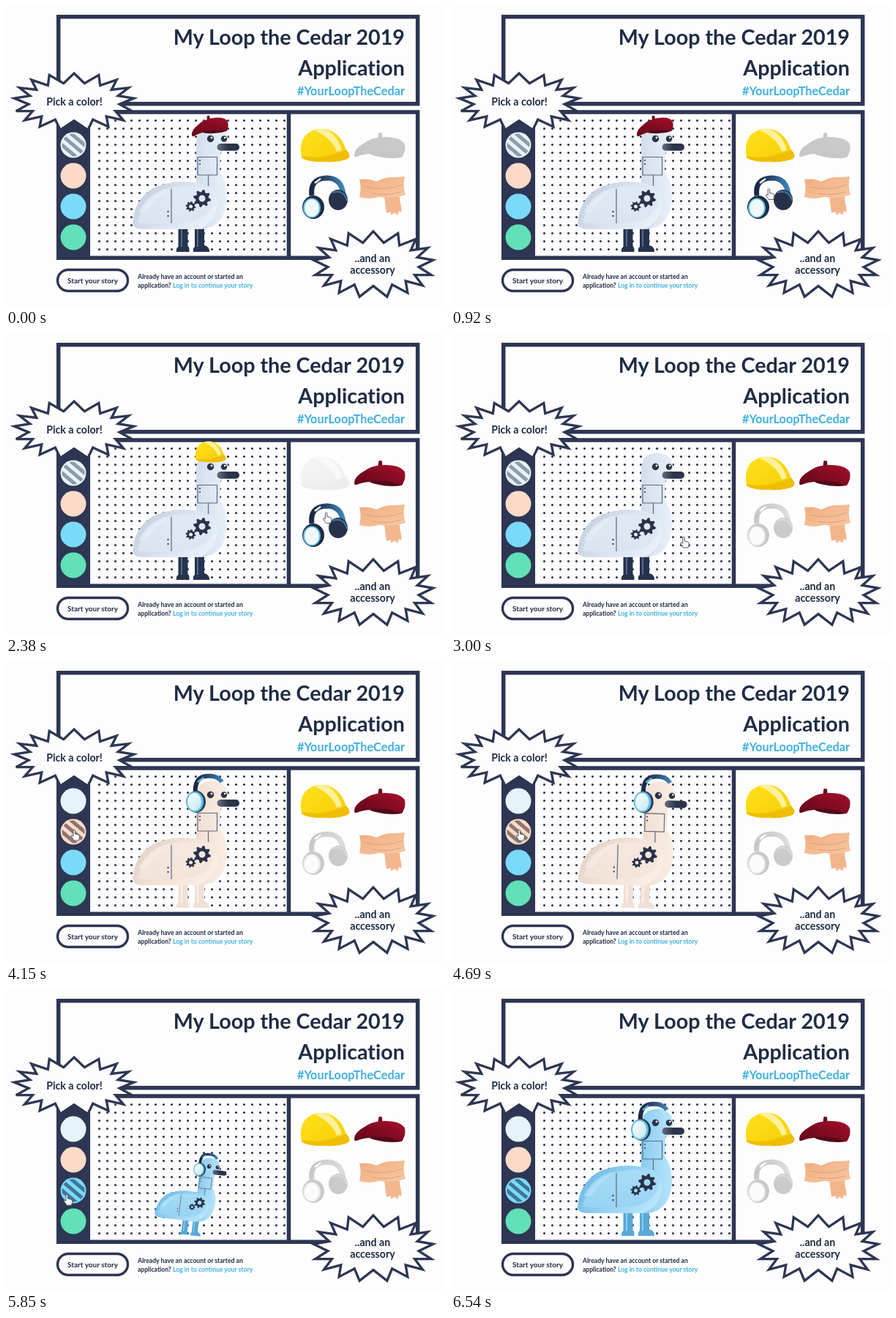
Write an HTML page that moves like this. It is 600x410 px and loops after 6620 ms.

```html
<!DOCTYPE html>
<html lang="en">
<head>
<meta charset="utf-8">
<title>Application</title>
<style>
html, body { margin: 0; width: 100%; height: 100%; overflow: hidden; background: #fdfdfe; }
svg { display: block; width: 600px; height: 410px; font-family: Lato, sans-serif; font-weight: 700; font-variant-ligatures: none; }
.ink { fill: #1f2c44; }
.teal { fill: #41b0e0; }
.line { fill: none; stroke: #2d3652; }
.thin { fill: none; stroke: #5c6a80; stroke-width: 1.2; }
.off { opacity: .24; filter: grayscale(1); }
</style>
</head>
<body>
<svg id="stage" viewBox="0 0 600 410">
<defs>
  <pattern id="dots" x="243" y="250.1" width="11" height="11" patternUnits="userSpaceOnUse">
    <circle cx="5.500" cy="5.500" r="1.550" fill="#26304a"/>
  </pattern>
  <linearGradient id="neck" x1="0" x2="1">
    <stop offset="0" style="stop-color:var(--shade)"/>
    <stop offset=".45" style="stop-color:var(--mid)"/>
    <stop offset="1" style="stop-color:var(--light)"/>
  </linearGradient>
  <linearGradient id="body" x1="0" y1=".2" x2="1" y2=".6">
    <stop offset="0" style="stop-color:var(--shade)"/>
    <stop offset=".5" style="stop-color:var(--mid)"/>
    <stop offset="1" style="stop-color:var(--light)"/>
  </linearGradient>
  <linearGradient id="wing" x1="0" y1="0" x2=".7" y2="1">
    <stop offset="0" style="stop-color:var(--light)"/>
    <stop offset="1" style="stop-color:var(--mid)"/>
  </linearGradient>
  <linearGradient id="beak"><stop stop-color="#666d80"/><stop offset=".5" stop-color="#2c344a"/></linearGradient>
  <linearGradient id="red" x1="0" y1="1" x2="1" y2="0"><stop stop-color="#5e0618"/><stop offset="1" stop-color="#a5102a"/></linearGradient>
  <linearGradient id="gold" x2="1" y2="1"><stop stop-color="#fee21c"/><stop offset="1" stop-color="#f6cb06"/></linearGradient>
  <linearGradient id="band"><stop stop-color="#1b2742"/><stop offset=".5" stop-color="#2b4a72"/><stop offset="1" stop-color="#3f86b5"/></linearGradient>
  <linearGradient id="pad" x2="1" y2="1"><stop stop-color="#fbfeff"/><stop offset="1" stop-color="#c4e8f0"/></linearGradient>
  <linearGradient id="wool" y1="0" x2="1" y2="1"><stop stop-color="#f0ad80"/><stop offset="1" stop-color="#f8c7a2"/></linearGradient>

  <g id="beret">
    <path d="M509 182 Q508 176 510 173 L514 173.500 Q514 178 515 182Z" fill="#6d0b1c"/>
    <path d="M476 203 Q476 195 490 187 Q501 179 518 179 Q540 179 545 189 Q547 198 541 207 Q524 205 511 203 Q494 200 479 206 Q476 207 476 203Z" fill="url(#red)"/>
    <path d="M498 201 Q520 199 541 207 Q520 210 498 203Z" fill="#520918"/>
  </g>
  <g id="helmet">
    <path d="M404 207 Q400 187 410 176 Q420 166 437 168 Q457 173 464 195 Q472 204 468 208 Q458 214 435 213 Q411 213 404 207Z" fill="url(#gold)"/>
    <path d="M422 170 Q431 166 438 169 Q454 178 459 197 L452 199 Q446 181 422 170Z" fill="#fff19a"/>
    <path d="M404 205 Q430 211 465 197 Q472 204 468 208 Q458 214 435 213 Q411 213 404 207Z" fill="#f0bd08"/>
  </g>
  <g id="phones">
    <path d="M418 259 Q415 236 438 235 Q459 235 461 258" fill="none" stroke="url(#band)" stroke-width="7"/>
    <path d="M422 242 L430 236" stroke="#eef4fa" stroke-width="2.500"/>
    <ellipse cx="454" cy="265" rx="13" ry="14" fill="#26324c"/>
    <path d="M446 255 Q462 250 466 266" fill="none" stroke="#3b7298" stroke-width="2.500"/>
    <ellipse cx="420" cy="275" rx="15" ry="16" fill="#1f2b45"/>
    <ellipse cx="418" cy="276" rx="12" ry="13.500" fill="#5cbce0"/>
    <ellipse cx="418" cy="276" rx="10" ry="12" fill="#f0f8fc"/>
  </g>
  <g id="worn">
    <path d="M259 181 Q257 158 273 156 Q289 154 295 164" fill="none" stroke="url(#band)" stroke-width="6"/>
    <path d="M262 164 L270 158" stroke="#5fb8de" stroke-width="2.500"/>
    <ellipse cx="260" cy="191" rx="13" ry="15" fill="#263a5c"/>
    <ellipse cx="258" cy="191" rx="12" ry="14" fill="#62bfe0"/>
    <ellipse cx="257.500" cy="191" rx="9.500" ry="12" fill="url(#pad)"/>
  </g>
  <g id="scarf">
    <path d="M516 252 L537 256 L541 282 L537 280 L535 286 L531 282 L527 286 L525 281 L520 283Z" fill="#f2b68c"/>
    <path d="M483 237 Q496 235 506 240 Q518 233 532 234 L545 233 Q542 245 546 258 Q529 264 510 261 Q496 265 483 261 Q486 248 483 237Z" fill="url(#wool)"/>
    <path d="M489 247 Q518 254 541 244 M500 256 Q520 260 540 254" fill="none" stroke="#e0a078" stroke-width="1"/>
  </g>
  <clipPath id="swatch"><circle r="15.500"/></clipPath>
</defs>

<rect width="600" height="410" fill="#fdfdfe"/>
<rect class="line" x="71.700" y="14.700" width="491" height="119" stroke-width="5.500"/>
<g class="ink" text-anchor="end" font-size="28.700">
  <text x="545" y="53">My Loop the Cedar 2019</text>
  <text x="545" y="95">Application</text>
  <text class="teal" x="545" y="122" font-size="16.300">#YourLoopTheCedar</text>
</g>

<rect x="120" y="147" width="264" height="195" fill="url(#dots)"/>
<path class="line" d="M71.700 145 H562.700 V344.200 H71.700Z M386.500 145 V344" stroke-width="5.500"/>
<rect x="69" y="142.300" width="46" height="204.600" fill="#2d3652"/>
<g id="swatches"></g>
<g id="shelf">
  <use href="#helmet"/><use href="#beret"/><use href="#phones"/><use href="#scarf"/>
</g>

<g id="goose">
  <g style="fill:var(--leg)">
    <path d="M235.500 300 H248.500 V328 Q251 330 250.500 336 H233 Q232 331 235.500 329Z"/>
    <path d="M258 300 H271 V327 Q278.500 329 278 336 H256 Q255 331 258 329Z"/>
  </g>
  <path d="M240 302 V329 M262 302 V329" fill="none" style="stroke:var(--gleam)" stroke-width="2"/>
  <path d="M260 252 V187 Q260 162.500 282 162.500 Q304 164 303 184 Q302 196 293 201 L292 228 Q303 240 302 264 Q299 302 268 305 H240Z" fill="url(#neck)"/>
  <path d="M173 297 Q175 266 199 250 Q225 237 257 241 Q287 245 289 268 Q287 296 262 305 H186 Q173 304 173 297Z" fill="url(#body)"/>
  <path d="M195 267 Q214 246 250 246 Q281 248 284 264 Q280 291 247 296 Q206 299 180 296 Q183 279 195 267Z" fill="url(#wing)" opacity=".75"/>
  <path d="M181 282 Q196 252 226 248 Q204 260 192 282Z" style="fill:var(--light)" opacity=".6"/>
  <path class="thin" d="M226 250 V297 M262 206.500 H288.500 V231 H262Z M276.500 231 V246"/>
  <g fill="#3c475e">
    <circle cx="221.500" cy="281" r="1.200"/><circle cx="221.500" cy="287" r="1.200"/>
    <circle cx="265" cy="211" r="1.100"/><circle cx="265" cy="216" r="1.100"/>
  </g>
  <path id="gears" fill="#28324a" fill-rule="evenodd"/>
  <rect x="288.500" y="188" width="30.500" height="9.800" rx="4.900" fill="url(#beak)"/>
  <g fill="#2b3346"><circle cx="279.500" cy="181.500" r="4.700"/><circle cx="298" cy="181.500" r="4.200"/></g>
  <g fill="#fff"><circle cx="281" cy="180" r="1.400"/><circle cx="299.300" cy="180" r="1.300"/></g>
  <g id="hat">
    <use href="#helmet" transform="translate(5 41) scale(.63)"/>
    <use href="#beret" transform="translate(278 163) rotate(-10) scale(.74) translate(-511 -191)"/>
    <use href="#worn"/>
  </g>
</g>

<g fill="#fdfdfe" stroke="#2d3652" stroke-width="3.300">
  <path id="burst1"/><path id="burst2"/>
</g>
<g class="ink" text-anchor="middle" font-size="14.200">
  <text x="93.500" y="136">Pick a color!</text>
  <text x="501" y="350">..and an</text>
  <text x="501" y="366">accessory</text>
  <text x="118.500" y="379" font-size="10">Start your story</text>
</g>
<rect class="line" x="70.500" y="360.500" width="96" height="29" rx="14.500" stroke-width="3.400"/>
<g class="ink" font-size="8.600">
  <text x="180" y="373">Already have an account or started an</text>
  <text x="180" y="385">application? <tspan class="teal">Log in to continue your story</tspan></text>
</g>

<path id="cursor" fill="#fdfdfe" stroke="#50586a" stroke-width="1" stroke-linejoin="round"
  d="M-3 -6 Q-2 -8 -.500 -6 V-1 L4 0 Q6 1 5.500 4 L4.500 8 H-2 L-6 2 Q-6 0 -3 2Z"/>
</svg>

<script>
const LOOP = 6620;
const $ = id => document.getElementById(id);
const lerp = (a, b, k) => a + (b - a) * k;
const clamp = k => Math.max(0, Math.min(1, k));

// CSS-style cubic Bezier timing
function bezier(x1, y1, x2, y2) {
  const at = (a, b, u) => 3 * a * u * (1 - u) ** 2 + 3 * b * u * u * (1 - u) + u ** 3;
  return x => {
    let lo = 0, hi = 1;
    for (let i = 0; i < 20; i++) {
      const mid = (lo + hi) / 2;
      if (at(x1, x2, mid) < x) lo = mid; else hi = mid;
    }
    return at(y1, y2, lo);
  };
}
const ease = bezier(.25, .1, .25, 1);
const easeOut = bezier(.215, .61, .355, 1);

// Eased value at p for stops [[position, value], ...]
function track(stops, p, curve) {
  p = clamp(p);
  const i = Math.max(1, stops.findIndex(s => s[0] >= p));
  const [p0, a] = stops[i - 1], [p1, b] = stops[i];
  return lerp(a, b, curve((p - p0) / (p1 - p0)));
}

// Spiky outline around a slightly squared ellipse
function burst(cx, cy, rx, ry, n) {
  const square = v => Math.sign(v) * Math.abs(v) ** .87;
  let d = '';
  for (let i = 0; i < 2 * n; i++) {
    const a = -Math.PI / 2 + i * Math.PI / n, out = i % 2 === 0;
    const x = cx + rx * (out ? 1 : .76) * square(Math.cos(a));
    const y = cy + ry * (out ? 1 : .66) * square(Math.sin(a));
    d += (i ? 'L' : 'M') + x.toFixed(1) + ' ' + y.toFixed(1);
  }
  return d + 'Z';
}

function gear(cx, cy, r, hole) {
  let d = '';
  for (let i = 0; i < 32; i++) {
    const a = (i + .5) * Math.PI / 16, k = i % 4 < 2 ? r : r * .74;
    d += (i ? 'L' : 'M') + (cx + k * Math.cos(a)).toFixed(1) + ' ' + (cy + k * Math.sin(a)).toFixed(1);
  }
  return `${d}ZM${cx - hole} ${cy}a${hole} ${hole} 0 1 0 ${2 * hole} 0a${hole} ${hole} 0 1 0 ${-2 * hole} 0Z`;
}

$('burst1').setAttribute('d', burst(93, 131, 82, 39, 17));
$('burst2').setAttribute('d', burst(502, 353, 82, 45, 17));
$('gears').setAttribute('d', gear(268, 263, 12, 4.5) + gear(252.5, 274, 7, 2.5));

const paints = ['#e6f4fa', '#fddac8', '#7bd9fa', '#62e0b8'];
const stripes = ['#8f99aa', '#8d7572', '#3f7595', '#3f8a80'];
$('swatches').innerHTML = paints.map((c, i) =>
  `<g transform="translate(92 ${190 + 42 * i})"><circle r="17.5" fill="${c}"/>
  <path clip-path="url(#swatch)" transform="rotate(40)" stroke="${stripes[i]}" stroke-width="5"
  d="M-20 -10H20M-20 0H20M-20 10H20"/></g>`).join('');

const coats = [
  { light: '#e9f0f9', mid: '#d8e2ee', shade: '#c2cddd', leg: '#26334e', gleam: '#536a8c' },
  { light: '#fbeee4', mid: '#f2e2d6', shade: '#e0cfc4', leg: '#f0e0d6', gleam: '#fbf2ec' },
  { light: '#b8e6fb', mid: '#93d0f2', shade: '#68b6e2', leg: '#58a8d8', gleam: '#8fcdf0' }
];

const HELMET_AT = 1000, PHONES_AT = 2740, DROP = 800;
const BEIGE_AT = 4145, BLUE_AT = 5716, JACK = 800;

// Pointer stops: time, x, y
const path = [
  [300, 400, 425], [1250, 450, 192], [1700, 450, 192], [2640, 437, 264], [2720, 437, 264],
  [3000, 320, 284], [3770, 95, 236], [5370, 95, 236], [5640, 90, 279], [5700, 90, 279],
  [5850, 85, 286], [6500, 66, 430]
];

function slope(i, c) {
  const a = path[i - 1], m = path[i], b = path[i + 1];
  if (!a || !b || a[c] === m[c] || b[c] === m[c]) return 0;
  return (b[c] - a[c]) / (b[0] - a[0]);
}

function pointer(t) {
  if (t <= path[0][0]) return path[0].slice(1);
  const i = path.findIndex(k => k[0] > t);
  if (i < 0) return path[path.length - 1].slice(1);
  const a = path[i - 1], b = path[i], h = b[0] - a[0], u = (t - a[0]) / h;
  return [1, 2].map(c => {
    const s = u * u * (3 - 2 * u);
    return lerp(a[c], b[c], s) + h * u * (1 - u) * ((1 - u) * slope(i - 1, c) - u * slope(i, c));
  });
}

function draw(t) {
  const coat = t < BEIGE_AT ? 0 : t < BLUE_AT ? 1 : 2;
  const hat = t < HELMET_AT ? 1 : t < PHONES_AT ? 0 : 2;
  for (const k in coats[coat]) $('stage').style.setProperty('--' + k, coats[coat][k]);
  [...$('swatches').children].forEach((g, i) => g.lastElementChild.style.display = i === coat ? '' : 'none');
  [...$('shelf').children].forEach((u, i) => u.classList.toggle('off', i === hat));
  [...$('hat').children].forEach((u, i) => u.style.display = i === hat ? '' : 'none');

  // The chosen accessory drops onto the head and bounces
  const p = hat === 1 ? 1 : clamp((t - (hat ? PHONES_AT : HELMET_AT)) / DROP);
  const y = track([[0, -3000], [.6, 25], [.75, -10], [.9, 5], [1, 0]], p, easeOut);
  $('hat').setAttribute('transform', `translate(0 ${y.toFixed(2)})`);
  $('hat').setAttribute('opacity', track([[0, 0], [.6, 1], [1, 1]], p, easeOut));

  // A new coat springs up from the feet
  const start = coat === 1 ? BEIGE_AT + 50 : BLUE_AT;
  const q = coat === 0 || t < start ? 1 : clamp((t - start) / JACK);
  const size = track([[0, .1], [.5, 1], [1, 1]], q, ease);
  const tilt = track([[0, 30], [.5, -10], [.7, 3], [1, 0]], q, ease);
  $('goose').setAttribute('transform',
    `translate(246 332) rotate(${tilt.toFixed(2)}) scale(${size.toFixed(3)}) translate(-246 -332)`);
  $('goose').setAttribute('opacity', clamp((size - .1) * 1.9));

  $('cursor').setAttribute('transform', `translate(${pointer(t).map(v => v.toFixed(1)).join(' ')})`);
}

const begin = performance.now();
function tick() {
  draw((performance.now() - begin) % LOOP);
  requestAnimationFrame(tick);
}
tick();
</script>
</body>
</html>
```
